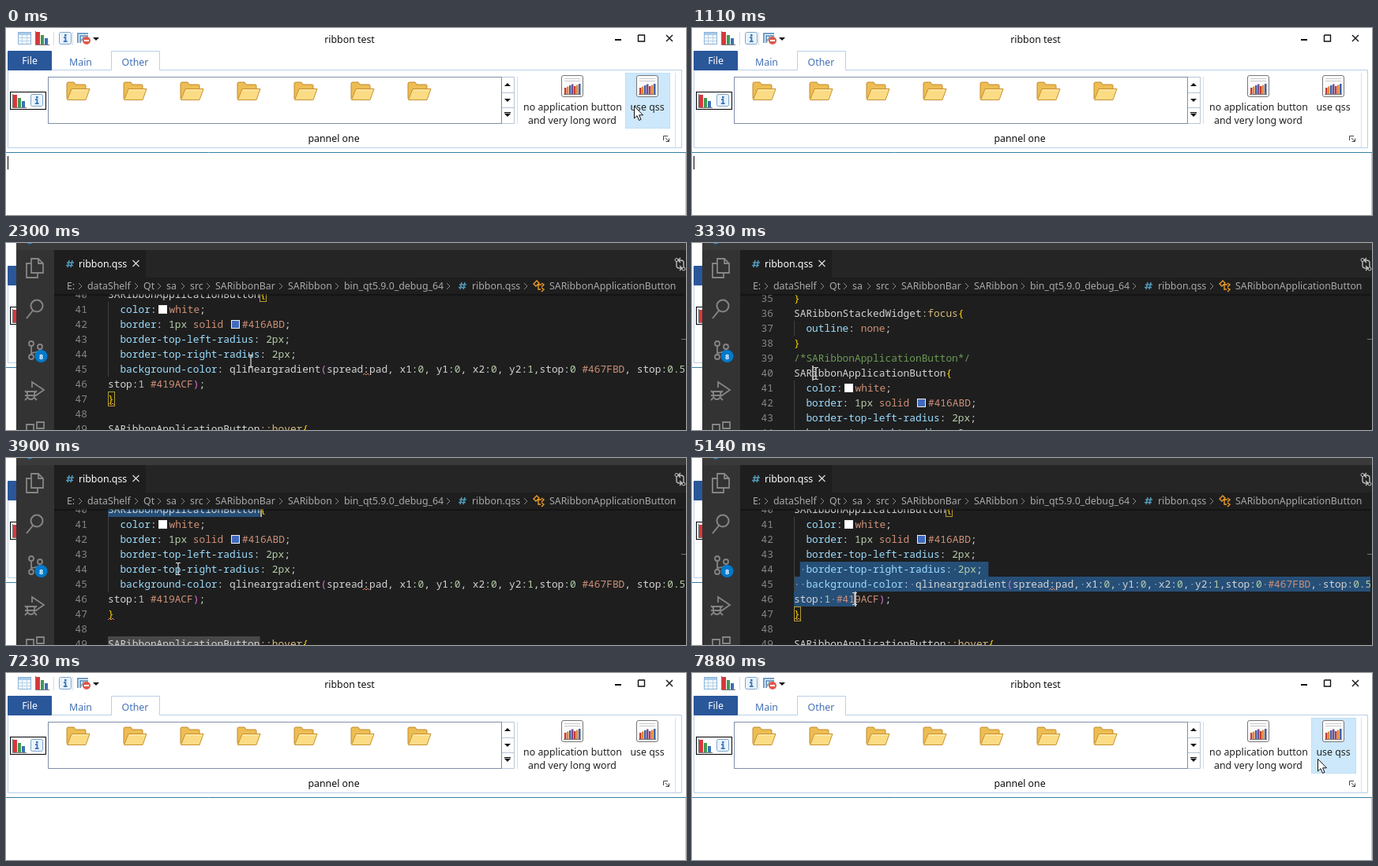
An HTML page that plays this animation: 861 px wide and 238 px high, repeating every 8 s.

```html
<!DOCTYPE html>
<html lang="en">
<head>
<meta charset="utf-8">
<title>Ribbon style editing</title>
<style>
  html, body { margin: 0; width: 100%; height: 100%; overflow: hidden; background: #fff; }
  svg { display: block; width: 861px; height: 238px; }
  text { font: 12.35px "Noto Sans", sans-serif; white-space: pre; }
  .code text { font: 12.83px "Noto Sans Mono", monospace; }
</style>
</head>
<body>
<svg id="stage" viewBox="0 0 861 238"></svg>
<script>
const LOOP = 8000;
const range = (n, f) => Array.from({ length: n }, (_, i) => f(i)).join('');
const rect = (x, y, w, h, fill, extra = '') =>
  `<rect x="${x}" y="${y}" width="${w}" height="${h}" fill="${fill}" ${extra}/>`;
const frame = (x, y, w, h, stroke, fill = 'none') =>
  rect(x + .5, y + .5, w - 1, h - 1, fill, `stroke="${stroke}"`);
const path = (d, stroke, fill = 'none', width = 1) =>
  `<path d="${d}" stroke="${stroke}" fill="${fill}" stroke-width="${width}"/>`;
const label = (x, y, s, fill = '#111', extra = '') =>
  `<text x="${x}" y="${y}" fill="${fill}" ${extra}>${s}</text>`;
const middle = 'text-anchor="middle"';
const at = (x, y, content) => `<g transform="translate(${x} ${y})">${content}</g>`;

// Value of the last step whose time has passed.
const step = (t, track) => track.reduce((v, [time, value]) => t >= time ? value : v, null);

/* ---------- ribbon window ---------- */
const barsIcon =
  rect(1, 1, 5, 16, '#d9363b') + rect(7, 5, 4, 12, '#3f9b51') + rect(12, 9, 4, 8, '#3c6fb4') +
  path('M.5 0V17.5H18', '#777');
const infoIcon =
  rect(.5, .5, 15, 15, '#eaf3fb', 'rx="2" stroke="#7ea6cc"') +
  rect(7, 3, 2.5, 2.5, '#3973b5') + path('M6 7.2H8.4V12M5.8 12.2H10.6', '#3973b5', 'none', 1.8);
const tableIcon =
  frame(0, 0, 17, 16, '#8db4d6', '#f5fafe') + rect(1, 1, 15, 3, '#a8cbe8') +
  path('M1 7.5H16M1 11.5H16M5.5 4V15M11.5 4V15', '#b9d2e6');
const removeIcon =
  path('M1 15V3H14M4 15V6H14', '#6f9fca', 'none', 2) + path('M4 14L10 5', '#8fa4b5', 'none', 2) +
  '<circle cx="12" cy="12" r="5" fill="#dc5a4b"/>' + rect(9, 11, 6, 2, '#fff');
const folderIcon =
  path('M1 22V3Q1 1 3 1H10L12 4H24Q25 4 25 6V10', '#c08a2b', '#edbd54') +
  path('M1.5 23.5L7 9.5H30L25 23.5Z', '#c8912f', '#fbdc84') + path('M8 11H28', '#fff0bd');
const reportIcon =
  rect(.5, .5, 27, 27, '#fbfbfb', 'rx="2.5" stroke="#777"') +
  path('M4 4.5H24M4 7.5H24', '#c9c9c9') +
  ['#c23b35', '#e08a35', '#3f62a8', '#7c4a8f', '#c23b35', '#e08a35', '#3f62a8']
    .map((c, i) => rect(4 + i * 3, 16 - i % 4 * 1.5 - (i > 3 ? 2 : 0), 2.5, 8 + i % 4 * 1.5 + (i > 3 ? 2 : 0), c)).join('') +
  path('M3 24.5H25', '#777');
const triangle = (x, y, dir) => path(`M${x - 4} ${y - 2 * dir}H${x + 4}L${x} ${y + 2 * dir}Z`, 'none', '#111');

const ribbon = [
  at(15, 5, tableIcon), at(37, 4, barsIcon), at(67, 5, infoIcon), at(90, 4, removeIcon),
  path('M60.5 5V22M84.5 5V22', '#d5dde5'), triangle(114, 14, 1),
  label(435, 19, 'ribbon test', '#111', middle),
  rect(771, 14, 8, 2, '#111'),
  path('M800.5 9H809M800.5 9V17H808.5V9', '#111', 'none', 1.4),
  path('M836 9L844 17M844 9L836 17', '#111', 'none', 1.4),
  path('M2.5 53.5H133.5V29.5H194.5V53.5H855.5V152.5H2.5Z', '#b9d0e6'),
  rect(2, 29, 56, 25, '#2a579a', 'rx="1"'),
  label(30, 46, 'File', '#fff', middle),
  label(94.5, 48, 'Main', '#4372b5', middle), label(163.5, 48, 'Other', '#4372b5', middle),
  frame(5, 81, 46, 23, '#000'), at(8, 84, barsIcon), at(31, 84, infoIcon),
  frame(53, 62, 575, 60, '#7f90a8'),
  range(7, i => at(76 + 72 * i, 68, folderIcon)),
  path('M628 62.5H643.5V121.5H628M628 82.5H643M628 101.5H643', '#b8c5d5'),
  triangle(635, 72, -1), triangle(635, 92, 1), triangle(635, 111, 1), rect(631, 107, 8, 1.3, '#111'),
  path('M647.5 62V122M847.5 57V152', '#d5e0ea'),
  at(703, 60, reportIcon), at(798, 60, reportIcon),
  label(717.5, 105, 'no application button', '#222', middle),
  label(717, 122, 'and very long word', '#222', middle),
  label(812, 105, 'use qss', '#222', middle),
  label(415, 145, 'pannel one', '#111', middle),
  path('M832.5 143V137.5H838M835 140L839 144M839.5 140.5V144.5H835.5', '#444'),
  path('M0 158.5H861', '#3580a8'), path('M860.5 159V238', '#b9d0e6')
].join('');

const arrow = ([x, y]) => at(x, y, path('M.5 .5V16L4 12.6 6.5 18.5 9 17.4 6.6 11.8H11.5Z', '#111', '#fff'));

/* ---------- editor window ---------- */
const LEFT = 129, CHAR = 7.7, ROW = 19, SWATCH = 16;
const colours = {
  plain: '#d4d4d4', prop: '#9cdcfe', value: '#ce9178', num: '#b5cea8',
  note: '#6a9955', pseudo: '#d7ba7d', brace: '#ffd700', paren: '#da70d6'
};
const radius = side => ['prop', `  border-top-${side}-radius`, 'plain', ': ', 'num', '2px', 'plain', ';'];
const button = 'SARibbonApplicationButton';
// Each line alternates colour name and text; a '#' name draws a colour swatch before its text.
const code = {
  35: ['brace', '}'],
  36: ['plain', 'SARibbonStackedWidget', 'pseudo', ':focus', 'brace', '{'],
  37: ['prop', '  outline', 'plain', ': ', 'value', 'none', 'plain', ';'],
  38: ['brace', '}'],
  39: ['note', `/*${button}*/`],
  40: ['plain', button, 'brace', '{'],
  41: ['prop', '  color', 'plain', ':', '#ffffff', 'white', 'plain', ';'],
  42: ['prop', '  border', 'plain', ': ', 'num', '1px', 'value', ' solid ', '#416abd', '#416ABD', 'plain', ';'],
  43: radius('left'),
  44: radius('right'),
  45: ['prop', '  background-color', 'plain', ': qlineargradient', 'paren', '(',
    'plain', 'spread:pad, x1:', 'num', '0', 'plain', ', y1:', 'num', '0', 'plain', ', x2:', 'num', '0',
    'plain', ', y2:', 'num', '1', 'plain', ',stop:', 'num', '0', 'value', ' #467FBD',
    'plain', ', stop:', 'num', '0.5'],
  46: ['plain', 'stop:', 'num', '1', 'value', ' #419ACF', 'paren', ')', 'plain', ';'],
  47: ['brace', '}'],
  48: [],
  49: ['plain', button, 'pseudo', '::hover', 'brace', '{']
};
const rowTop = n => 75 + ROW * (n - 41);
const colX = col => LEFT + col * CHAR;
const lineText = n => code[n].filter((_, i) => i % 2).join('');

function codeLine(n) {
  const y = rowTop(n) + 14;
  let spans = '', swatches = '', col = 0;
  for (let i = 0; i < code[n].length; i += 2) {
    const [kind, s] = code[n].slice(i, i + 2), swatch = kind[0] === '#';
    if (swatch) swatches += frame(Math.round(colX(col) + 2), y - 10, 11, 11, '#eee', kind);
    spans += `<tspan ${swatch ? `dx="${SWATCH}"` : ''} fill="${colours[swatch ? 'value' : kind]}">${s}</tspan>`;
    col += s.length;
  }
  return label(103, y, n, '#858585', 'text-anchor="end"') + label(LEFT, y, spans) + swatches;
}
const squiggle = (x, n) => path(`M${x} ${rowTop(n) + 17}l2 -2 2 2 2 -2 2 2`, '#e0805a');
const codeText =
  path(`M129.5 ${rowTop(37)}v${ROW}M129.5 ${rowTop(41)}v${ROW * 5}`, '#404040') +
  Object.keys(code).map(n => codeLine(+n)).join('') + squiggle(452, 45) + squiggle(LEFT, 47);

function selection([from, start, to, end]) {
  let out = '';
  for (let n = from; n <= to; n++) {
    const s = lineText(n), a = n === from ? start : 0, b = n === to ? end : s.length + 1;
    out += rect(colX(a), rowTop(n), (b - a) * CHAR, ROW, '#264f78');
    for (let c = a; c < b; c++)
      if (s[c] === ' ') out += rect(colX(c) + 3, rowTop(n) + 9, 1.6, 1.6, '#7892ab');
  }
  return out;
}
const matches = rect(colX(2), rowTop(39), 25 * CHAR, ROW, '#484848') + rect(LEFT, rowTop(49), 25 * CHAR, ROW, '#484848');
const bracePair = frame(321, rowTop(40), 9, ROW, '#b39b2e') + frame(LEFT, rowTop(47), 9, ROW, '#b39b2e');

const grey = '#858585';
const activityBar = [
  rect(13, 0, 48, 238, '#333'),
  path('M32 20H41L47 26V38H32ZM41 20V26H47M32 26H26V44H40V38', grey, 'none', 1.8),
  path('M34 86L26 96M46.5 80A7.5 7.5 0 1 1 31.500 80A7.5 7.5 0 1 1 46.500 80', grey, 'none', 2),
  path('M32 131V142M43 135Q43 139 32 140', grey, 'none', 1.8),
  [[32, 128], [43, 132], [32, 145]].map(([x, y]) => `<circle cx="${x}" cy="${y}" r="3" fill="#333" stroke="${grey}" stroke-width="1.8"/>`).join(''),
  '<circle cx="44.500" cy="144" r="8" fill="#007acc"/>',
  label(44.5, 147.5, '8', '#fff', middle + ' style="font-size:9px;font-weight:700"'),
  path('M33 184V177L48 187L38 194M27 189H36V195Q35 199 31.500 199T27 195ZM24 188L27 191M39 188L36 191M24 194H39M24 200L27 197M39 200L36 197', grey, 'none', 1.8),
  path('M26 240V231H35V240M39 228H48V236H39Z', grey, 'none', 1.8)
].join('');

const crumbs = [[77, 'E:'], [103, 'dataShelf'], [174, 'Qt'], [203, 'sa'], [233, 'src'], [265, 'SARibbonBar'],
  [357, 'SARibbon'], [428, 'bin_qt5.9.0_debug_64'], [590, 'ribbon.qss']];
const hash = (x, y) => path(`M${x + 3} ${y}L${x + 1} ${y + 9}M${x + 7} ${y}L${x + 5} ${y + 9}M${x} ${y + 3}H${x + 9}M${x - 1} ${y + 6.500}H${x + 8}`, '#519aba', 'none', 1.5);
const chevrons = [92, 163, 192, 222, 254, 346, 417, 558, 656]
  .map(x => path(`M${x} 51L${x + 4} 55L${x} 59`, '#8a8a8a')).join('');
const classIcon = path('M668 52L672 48L675 51L671 55ZM673 53H678M674 53V59H677M678 51L681 53L678 56M678 57L681 59L678 62', '#ee9d28', 'none', 1.4);

const header = [
  rect(61, 0, 800, 9, '#3a3a3b'), rect(61, 9, 800, 35, '#252526'), rect(61, 9, 116, 35, '#1e1e1e'),
  rect(13, 0, 48, 9, '#3a3a3b'), '<circle cx="30" cy="-3.500" r="5" fill="#2489ca"/>',
  hash(77, 22), label(92, 31, 'ribbon.qss', '#fff'),
  path('M160.500 22L168.500 30M168.500 22L160.500 30', '#ddd', 'none', 1.2),
  path('M849 23V29Q849 32 853 32H855M853 29L856 32L853 35M858 31V25Q858 22 854 22H852M854 19L851 22L854 25', '#c5c5c5', 'none', 1.3),
  '<circle cx="849" cy="21.500" r="2" fill="none" stroke="#c5c5c5"/><circle cx="858" cy="33" r="2" fill="none" stroke="#c5c5c5"/>',
  rect(61, 44, 800, 21, '#1e1e1e'),
  crumbs.map(([x, s]) => label(x, 59, s, '#a9a9a9')).join(''), chevrons, hash(574, 50),
  rect(61, 65, 798, 2, '#000', 'opacity=".35"')
].join('');

const iBeam = ([x, y]) => at(x, y, path('M-3 -7.500H-1L0 -6.500L1 -7.500H3M0 -6.500V6.500M-3 7.500H-1L0 6.500L1 7.500H3', '#ddd', 'none', 1.2));

/* ---------- timeline ---------- */
const SHOW_EDITOR = 1420, HIDE_EDITOR = 7230;
const ribbonCursor = [[0, [795, 99]], [270, [787, 110]], [680, null], [7500, [772, 172]], [7640, [796, 116]], [7880, [792, 109]]];
const hover = [[0, true], [680, false], [7640, true]];
const ribbonCaret = [[0, true], [680, false], [1110, true], [HIDE_EDITOR, false]];
const scroll = [[0, 0], [2600, 50], [2740, 100], [3760, 50], [3900, 0]];
const pointer = [
  [1860, [420, 228]], [2000, [370, 190]], [2150, [330, 160]], [2300, [310, 150]],
  [2890, [260, 160]], [3040, [200, 166]], [3190, [165, 167]], [3330, [157, 166]],
  [3760, [170, 160]], [3900, [218, 141]], [4020, [200, 142]], [4300, [160, 142]], [4540, [140, 142]],
  [4830, [138, 142]], [4990, [165, 160]], [5140, [206, 179]], [5260, [230, 180]], [5400, [250, 180]],
  [5840, [240, 196]], [5990, [200, 217]], [6260, [210, 219]], [6680, [640, 90]], [6800, null]
];
const selected = [[3490, [40, 0, 40, 25]], [4830, null], [4990, [44, 1, 45, 5]], [5140, [44, 1, 46, 10]],
  [5260, [44, 1, 46, 13]], [5400, [44, 1, 46, 16]], [5990, null]];
const caretAt = [[3330, [40, 3]], [3490, [40, 25]], [4830, [44, 1]], [4990, [45, 5]], [5140, [46, 10]],
  [5260, [46, 13]], [5400, [46, 16]], [5990, [48, 0]]];
const braces = [[0, true], [3330, false], [4830, true], [5990, false]];

function ribbonScene(t) {
  const cursor = step(t, ribbonCursor);
  return (step(t, hover) ? frame(784, 57, 57, 71, '#bfe0f5', '#cde8fb') : '') + ribbon +
    (step(t, ribbonCaret) ? rect(2, 163, 1, 17, '#000') : '') + (cursor ? arrow(cursor) : '');
}

function editorScene(t) {
  const sel = step(t, selected), caret = step(t, caretAt), mouse = step(t, pointer);
  const wordSelected = sel && sel[0] === 40;
  const lines = (wordSelected ? matches : '') + (sel ? selection(sel) : '') + codeText +
    (step(t, braces) ? bracePair : '') +
    (caret ? rect(Math.round(colX(caret[1])), rowTop(caret[0]), 2, ROW, '#aeafad') : '');
  const lastCrumb = t >= 5990 ? label(666, 59, '...', '#a9a9a9') : classIcon + label(688, 59, button, '#a9a9a9');
  return ribbon + rect(61, 65, 800, 173, '#1e1e1e') + activityBar +
    `<svg class="code" x="61" y="65" width="798" height="173" viewBox="61 65 798 173">${at(0, step(t, scroll), lines)}</svg>` +
    header + lastCrumb + rect(855, 122, 6, 1, '#777') + (mouse ? iBeam(mouse) : '');
}

const stage = document.getElementById('stage');
let shown = '';
function draw(now) {
  const t = now % LOOP;
  const scene = t >= SHOW_EDITOR && t < HIDE_EDITOR ? editorScene(t) : ribbonScene(t);
  if (scene !== shown) stage.innerHTML = shown = scene;
}
const start = performance.now();
function tick() {
  draw(performance.now() - start);
  requestAnimationFrame(tick);
}
tick();
</script>
</body>
</html>
```
